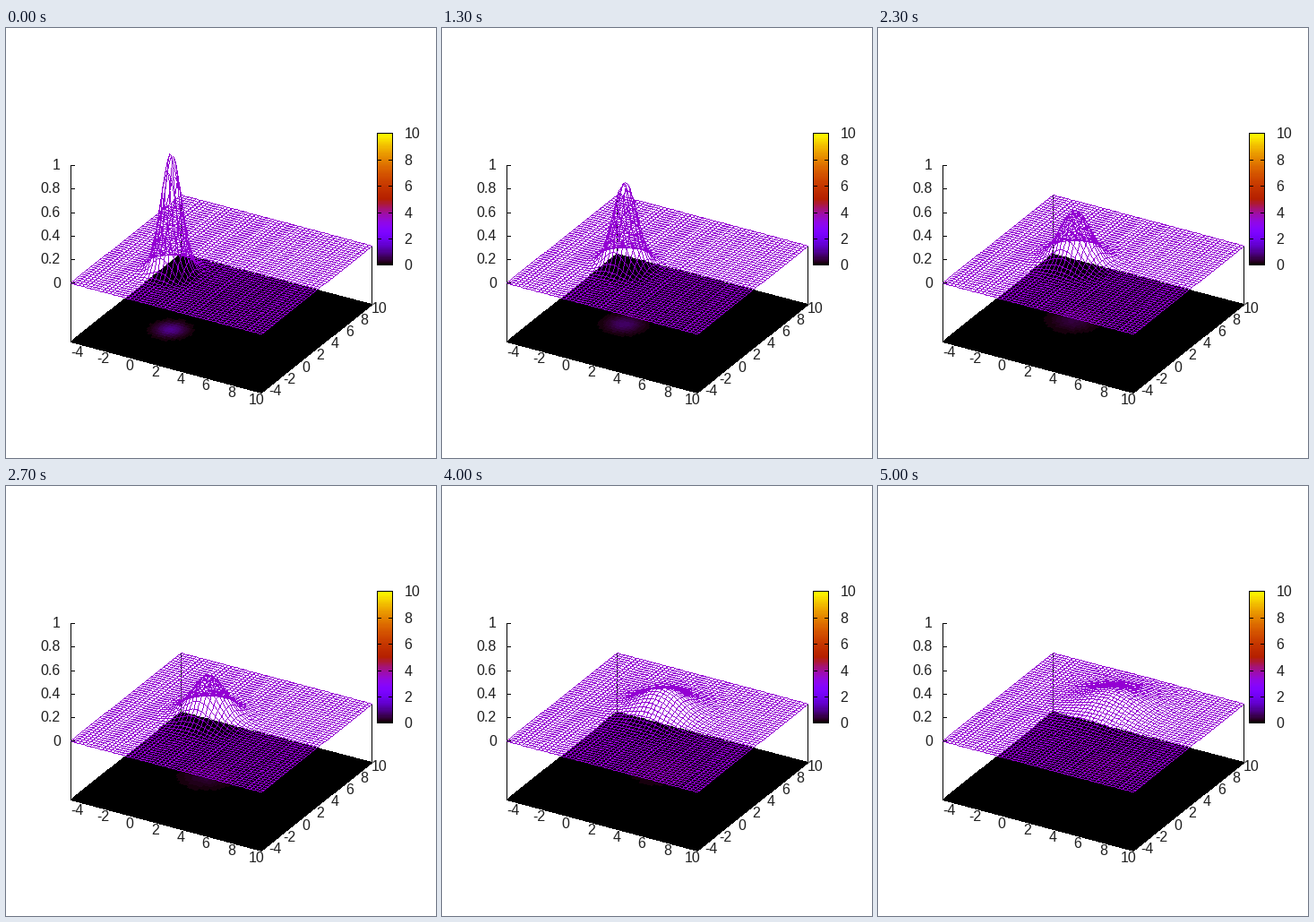
A matplotlib script for the animation above (5.1 s loop, 480 by 480 pixels).

```python
import numpy as np
import matplotlib.pyplot as plt
from matplotlib.animation import FuncAnimation
from matplotlib.colors import ListedColormap

SIZE, DPI = 480, 80
FRAMES, INTERVAL = 51, 100
LO, HI = -5, 10
LINES, SAMPLES = 50, 100
BLACK = (0, 0, 0, 255)
VIOLET = (148, 0, 211, 255)

# Orthographic view: tilt and turn, centre of the base and scales in pixels
TILT, TURN = np.radians(60), np.radians(30)
CENTER_X, CENTER_Y = 240.0, 329.2
SCALE_X, SCALE_Y = 246.3, 227.5
Z_BASE, Z_TOP = -0.5, 1


def project(x, y, z):
    a = (np.asarray(x, float) - LO) / (HI - LO) - 0.5
    b = (np.asarray(y, float) - LO) / (HI - LO) - 0.5
    h = (np.asarray(z, float) - Z_BASE) / (Z_TOP - Z_BASE)
    across = a * np.cos(TURN) + b * np.sin(TURN)
    depth = b * np.cos(TURN) - a * np.sin(TURN)
    px = CENTER_X + SCALE_X * across
    py = CENTER_Y - SCALE_Y * (depth * np.cos(TILT) + h * np.sin(TILT))
    return np.stack([px, py], axis=-1)


def packet(x, y, t):
    """Density of a free wave packet with velocity (1, 2) that spreads in time."""
    s = 1 + t * t
    return np.exp(-((x - t) ** 2 + (y - 2 * t) ** 2) / s) / s


def trace(img, points, color):
    """Draw polylines of shape (..., n, 2) one pixel wide, without smoothing."""
    p = np.floor(np.asarray(points, float) + 0.5)
    start, step = p[..., :-1, :], np.diff(p, axis=-2)
    length = np.abs(step).max(axis=-1)
    k = np.arange(length.max() + 1)
    part = np.minimum(k / np.maximum(length, 1)[..., None], 1)
    dots = start[..., None, :] + step[..., None, :] * part[..., None]
    dots = np.floor(dots + 0.5).astype(int)
    img[dots[..., 1], dots[..., 0]] = color


def make_palette(n=128):
    g = np.linspace(0, 1, n)
    blue = np.clip(np.sin(2 * np.pi * g), 0, 1)
    return ListedColormap(np.column_stack([np.sqrt(g), g ** 3, blue]))


def draw_box(img):
    corners = [(LO, LO), (HI, LO), (HI, HI), (LO, HI)]
    base = [project(x, y, Z_BASE) for x, y in corners]
    trace(img, base + base[:1], BLACK)
    for (x, y), foot in zip(corners, base):
        top = Z_TOP if (x, y) == (LO, LO) else 0
        trace(img, [foot, project(x, y, top)], BLACK)
    for z in np.linspace(0, 1, 6):
        p = project(LO, LO, z)
        trace(img, [p, p + [4, 0]], BLACK)


def draw_color_bar(img, palette):
    left, right, top, bottom = 414, 431, 117, 264
    rows = np.arange(top, bottom + 1)
    colors = palette((bottom - rows) / (bottom - top), bytes=True)
    img[top:bottom + 1, left:right] = colors[:, None]
    trace(img, [(left, top), (right, top), (right, bottom),
                (left, bottom), (left, top)], BLACK)
    for v in range(0, 11, 2):
        y = np.ceil(bottom - v / 10 * (bottom - top))
        trace(img, [(left, y), (left + 4, y)], BLACK)
        trace(img, [(right - 4, y), (right, y)], BLACK)
        label(v, 444.2, y, "left")


def label(value, x, y, align="center"):
    ax.text(x, y + 5.2, f"{value:g}", ha=align, va="baseline",
            family="Liberation Sans", size=16 * 72 / DPI, color="0.12")


def draw_labels():
    for v in range(-4, 11, 2):
        shift = -1.5 if v < 0 else 0
        x, y = project(v, LO, Z_BASE)
        label(v, x - 5.6 + shift, y + 7)
        x, y = project(HI, v, Z_BASE)
        label(v, x + 7.8 + shift, y + 3.8)
    for z in np.linspace(0, 1, 6):
        label(round(z, 1), 60.3, project(LO, LO, z)[1] - 0.5, "right")


fig = plt.figure(figsize=(SIZE / DPI, SIZE / DPI), dpi=DPI, facecolor="white")
ax = fig.add_axes([0, 0, 1, 1])
ax.axis("off")

palette = make_palette()
fine = np.linspace(LO, HI, SAMPLES)
coarse = np.linspace(LO, HI, LINES)
GX, GY = np.meshgrid(fine, coarse)

# Coloured map on the base plane
floor_xy = project(GX, GY, Z_BASE)
floor_map = ax.pcolormesh(floor_xy[..., 0], floor_xy[..., 1],
                          np.zeros((LINES - 1, SAMPLES - 1)),
                          cmap=palette, vmin=0, vmax=10,
                          antialiased=False, zorder=1)

# Axes, colour bar and wire surface share one pixel layer
backdrop = np.zeros((SIZE, SIZE, 4), np.uint8)
draw_box(backdrop)
draw_color_bar(backdrop, palette)
draw_labels()
layer = ax.imshow(backdrop, interpolation="nearest", aspect="auto", zorder=2)
ax.set_xlim(-0.5, SIZE - 0.5)
ax.set_ylim(SIZE - 0.5, -0.5)


def update(i):
    t = 0.05 * i
    z = packet(GX, GY, t)
    cells = (z[:-1, :-1] + z[1:, :-1] + z[:-1, 1:] + z[1:, 1:]) / 4
    floor_map.set_array(cells)

    img = backdrop.copy()
    trace(img, project(GX, GY, z), VIOLET)
    trace(img, project(GY, GX, packet(GY, GX, t)), VIOLET)
    layer.set_data(img)
    return floor_map, layer


anim = FuncAnimation(fig, update, frames=FRAMES, interval=INTERVAL,
                     repeat=True, repeat_delay=0, blit=False)
plt.show()
```
